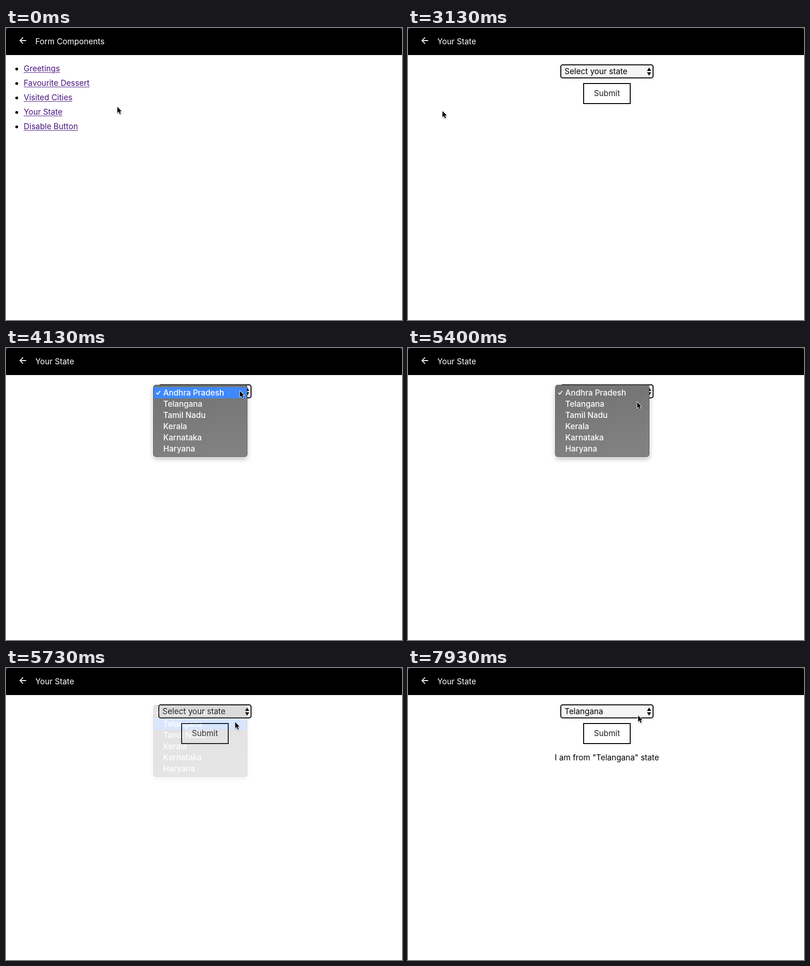
An HTML page that plays this animation: 850x626 px, repeating every 8000 ms.

```html
<!DOCTYPE html>
<html lang="en">
<head>
<meta charset="utf-8">
<title>Form Components</title>
<style>
  html, body { margin: 0; width: 100%; height: 100%; overflow: hidden; background: #fff; }
  body { position: relative; font: 17px/20px Inter, "Open Sans", sans-serif; color: #000; }
  body *, svg { position: absolute; box-sizing: border-box; white-space: nowrap; }
  svg { overflow: visible; }
  svg * { position: static; }
  #corners { left: 0; top: 0; width: 850px; height: 10px; background: #555; }
  #bar { left: 0; top: 0; width: 850px; height: 58px; background: #000; border-radius: 5px 5px 0 0; color: #fff; }
  #title { left: 63px; top: 19px; }
  .link { left: 38px; color: #4a1580; text-decoration: underline 1px; text-underline-offset: 2px; }
  .dot { left: 20px; width: 6px; height: 6px; border-radius: 50%; background: #000; }
  #select { left: 327px; top: 78px; width: 200px; height: 30px; border: 2px solid #000; border-radius: 5px; background: #f5f5f5; }
  #value { left: 7px; top: 3px; }
  #submit { left: 376px; top: 118px; width: 102px; height: 45px; border: 2px solid #000; background: #fff; color: #222; text-align: center; line-height: 41px; }
  #result { left: 227px; top: 182px; width: 400px; text-align: center; }
  #menu { left: 316px; top: 79px; width: 202px; height: 154px; border-radius: 5px; border: 1px solid #3c3c3c;
    background: linear-gradient(170deg, #727272, #838383);
    box-shadow: 0 5px 11px rgba(0,0,0,.26), inset 0 0 0 1px rgba(255,255,255,.12); color: #fff; font-weight: 500; }
  .row { left: 0; width: 200px; height: 24px; padding: 2px 0 0 20.5px; }
  .row.on { background: #4089fd; }
</style>
</head>
<body>
<div id="corners"></div>
<div id="bar">
  <svg width="22" height="22" viewBox="0 0 24 24" style="left:25.3px;top:16px">
    <path fill="#fff" d="M20 11H7.83l5.59-5.59L12 4l-8 8 8 8 1.41-1.41L7.83 13H20z"/>
  </svg>
  <span id="title"></span>
</div>
<div id="list"></div>
<div id="form">
  <div id="select">
    <span id="value"></span>
    <svg width="9" height="17" style="left:183.5px;top:4.5px"><path d="M4.5 0L9 7H0zM0 10H9L4.5 17z"/></svg>
  </div>
  <div id="submit">Submit</div>
  <div id="result">I am from "Telangana" state</div>
  <div id="menu"></div>
</div>
<svg id="cursor" width="20" height="20" style="left:0;top:0">
  <g id="arrow">
    <path id="arrowShape" d="M0 0V13L3 10.2L5.2 15.4L7.4 14.5L5.2 9.4H9.2Z" fill="#000" stroke="#fff" stroke-width="2"
      paint-order="stroke" stroke-linejoin="round" style="filter:drop-shadow(0 1px 1px rgba(0,0,0,.4))"/>
  </g>
  <g id="hand" fill="#fff" stroke="#000" stroke-linejoin="round" stroke-linecap="round">
    <path d="M-2.4 9.5V.8Q-2.4-.8-.9-.8T.7.8V5Q2.2 4.2 3.3 5.5Q4.9 4.9 5.7 6.4Q7.7 6 8 8.2V11Q7.7 13.4 6.5 14.6V16.5H-1.3V15Q-3.5 12.8-5.9 9.6Q-6.6 8.1-5.2 7.6Q-3.9 7.3-2.4 9.5Z"
      style="filter:drop-shadow(0 1px 1px rgba(0,0,0,.3))"/>
    <path d="M.7 5V8M3.3 5.7V8.2M5.7 6.6V8.6M.6 10.5V13.5M2.7 10.5V13.5M4.8 10.5V13.5" stroke-width=".9"/>
  </g>
</svg>
<script>
const $ = id => document.getElementById(id);
const LOOP = 8000, FPS = 15;
const links = ["Greetings", "Favourite Dessert", "Visited Cities", "Your State", "Disable Button"];
const states = ["Andhra Pradesh", "Telangana", "Tamil Nadu", "Kerala", "Karnataka", "Haryana"];

// Steps at which the interface changes
const OPEN_PAGE = 16, OPEN_MENU = 62, PICK = 81, FADE = 82, CLOSE = 87, SENT = 103;

// Pointer path: step, x, y
const path = [
  [8, 239, 169], [9, 196, 145], [10, 120, 151], [11, 58, 178], [12, 42, 198], [13, 64, 187], [14, 76, 182],
  [46, 76, 182], [47, 74, 178], [49, 74, 178], [57, 510, 98], [59, 504, 94], [61, 504, 94], [62, 502, 92],
  [68, 502, 92], [75, 492, 116], [95, 492, 116], [100, 443, 142], [110, 443, 142], [115, 494, 102]
];

function add(parent, className, top, text = "") {
  const el = document.createElement("div");
  el.className = className;
  el.style.top = top + "px";
  el.textContent = text;
  parent.append(el);
  return el;
}

links.forEach((text, i) => {
  add($("list"), "dot", 85 + 31 * i);
  add($("list"), "link", 77 + 31 * i, text);
});
const rows = states.map((text, i) => add($("menu"), "row", 4 + 24 * i, text));
rows[0].insertAdjacentHTML("beforeend",
  '<svg width="10" height="9" style="left:5px;top:7px"><path d="M.8 5L3.6 8L9 1" fill="none" stroke="#fff" stroke-width="1.9"/></svg>');

function pointerAt(step) {
  const next = path.findIndex(key => key[0] > step);
  if (next === 0) return path[0].slice(1);
  if (next < 0) return path[path.length - 1].slice(1);
  const [s0, x0, y0] = path[next - 1], [s1, x1, y1] = path[next];
  const u = (step - s0) / (s1 - s0), k = u * u * (3 - 2 * u);
  return [x0 + (x1 - x0) * k, y0 + (y1 - y0) * k].map(Math.round);
}

function overTarget(x, y, onForm) {
  if (onForm) return x > 376 && x < 478 && y > 118 && y < 163;
  return [...document.querySelectorAll(".link")].some(el =>
    x >= 38 && x < 38 + el.offsetWidth && y >= el.offsetTop && y < el.offsetTop + 20);
}

function show(el, on) {
  el.style.visibility = on ? "inherit" : "hidden";
}

function draw(step) {
  const onForm = step >= OPEN_PAGE;
  const [x, y] = pointerAt(step);
  const hand = overTarget(x, y, onForm);

  show($("list"), !onForm);
  show($("form"), onForm);
  $("title").textContent = onForm ? "Your State" : "Form Components";
  $("value").textContent = step < CLOSE ? "Select your state" : "Telangana";
  show($("result"), step >= SENT);

  show($("menu"), onForm && step >= OPEN_MENU && step < CLOSE);
  $("menu").style.opacity = Math.min(1, 1 - (step - FADE) * 0.2);
  const active = step === PICK ? -1 : Math.floor((y - 84) / 24);
  rows.forEach((row, i) => row.classList.toggle("on", i === active));

  $("cursor").style.transform = `translate(${x}px, ${y}px)`;
  show($("arrow"), !hand);
  show($("hand"), hand);
}

function tick() {
  const t = performance.now() % LOOP;
  draw(Math.floor((t + 5) * FPS / 1000) % (LOOP * FPS / 1000));
  requestAnimationFrame(tick);
}
tick();
</script>
</body>
</html>
```
